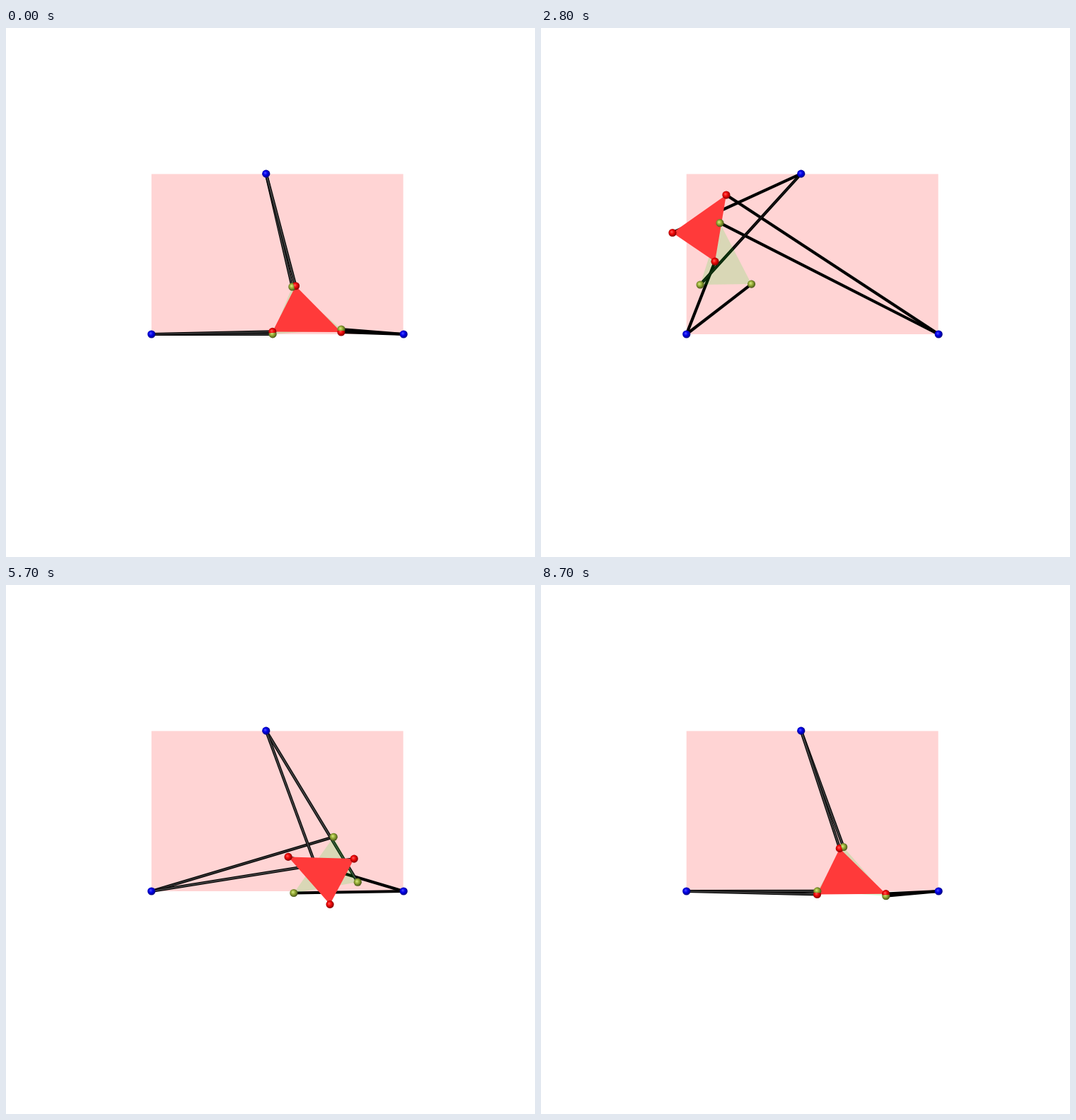
An HTML page with a canvas for the animation above (8800 ms loop, 748 by 748 pixels).

```html
<!DOCTYPE html>
<html lang="en">
<head>
<meta charset="utf-8">
<title>Planar platform and its closest singular pose</title>
<style>
  html, body { margin: 0; width: 100%; height: 100%; overflow: hidden; background: #fff; }
  canvas { display: block; }
</style>
</head>
<body>
<canvas id="stage" width="748" height="748"></canvas>
<script>
const ctx = document.getElementById('stage').getContext('2d');
const FRAMES = 88, FRAME_MS = 100, SCALE = 32.41;
const BASE = [[0, 0], [11, 0], [5, 7]];
const PLATFORM = [[0, 0], [3, 0], [1, 2]];
const PLATE_STIFFNESS = 2.2;
const TAU = 2 * Math.PI;

const BALLS = {
  blue: ['#5050ff', '#0000ea', '#000078'],
  red: ['#ff6060', '#f20808', '#7c0000'],
  green: ['#d8ec88', '#98ae38', '#425016']
};

// Given pose as a flat list x1, y1, x2, y2, x3, y3.
function givenPose(frame) {
  const phi = TAU * (frame + 1) / (FRAMES + 1), c = Math.cos(phi), s = Math.sin(phi);
  return PLATFORM.flatMap(([x, y]) =>
    [5.5 - 3 * s + c * x - s * y, 1.5 - 1.5 * c + s * x + c * y]);
}

const legLengths = pose => BASE.map(([x, y], i) => Math.hypot(pose[2 * i] - x, pose[2 * i + 1] - y));
const energy = list => list.reduce((sum, v) => sum + v * v, 0);
const distance = (p, q) => Math.sqrt(energy(p.map((v, i) => v - q[i])));

// Scaled strains of legs and plate; each is linear in the squared lengths.
function strains(r, lengths) {
  const out = BASE.map(([ax, ay], i) => {
    const dx = r[2 * i] - ax, dy = r[2 * i + 1] - ay, len = lengths[i];
    return ((dx * dx + dy * dy) / (len * len) - 1) / 2 * Math.sqrt(len);
  });
  const ux = r[2] - r[0], uy = r[3] - r[1], vx = r[4] - r[0], vy = r[5] - r[1];
  const e11 = (ux * ux + uy * uy - 9) / 18;
  const e12 = ((ux * vx + uy * vy - 3) / 6 - e11) / 2;
  const e22 = ((vx * vx + vy * vy - 5) / 2 - e11 - 4 * e12) / 4;
  const k = 2 * Math.sqrt(PLATE_STIFFNESS);
  out.push(k * (e11 + e22 / 2), k * Math.sqrt(0.75) * e22, k * e12);
  return out;
}

// Zero when the three leg lines meet in one point.
function concurrency(r, lengths) {
  const [a, b, c] = BASE.map(([ax, ay], i) => {
    const dx = r[2 * i] - ax, dy = r[2 * i + 1] - ay;
    return [dx, dy, ax * dy - ay * dx].map(v => v / lengths[i]);
  });
  return a[0] * (b[1] * c[2] - b[2] * c[1])
    - a[1] * (b[0] * c[2] - b[2] * c[0])
    + a[2] * (b[0] * c[1] - b[1] * c[0]);
}

function solve(m, b) {
  const n = b.length;
  for (let i = 0; i < n; i++) {
    for (let j = i + 1; j < n; j++) {
      const f = m[j][i] / m[i][i];
      for (let k = i; k < n; k++) m[j][k] -= f * m[i][k];
      b[j] -= f * b[i];
    }
  }
  for (let i = n - 1; i >= 0; i--) {
    for (let k = i + 1; k < n; k++) b[i] -= m[i][k] * b[k];
    b[i] /= m[i][i];
  }
  return b;
}

// Levenberg-Marquardt descent on a list of residuals.
function descend(residuals, r, steps, damping = 0.02) {
  let res = residuals(r), cost = energy(res);
  const dot = (p, q) => p.reduce((sum, v, i) => sum + v * q[i], 0);
  while (steps-- > 0) {
    const columns = r.map((v, i) => {
      const moved = r.slice();
      moved[i] += 1e-6;
      return residuals(moved).map((q, j) => (q - res[j]) / 1e-6);
    });
    const normal = columns.map((p, i) => columns.map((q, j) => dot(p, q) + (i === j ? damping : 0)));
    const step = solve(normal, columns.map(p => -dot(p, res)));
    const next = r.map((v, i) => v + step[i]);
    const nextRes = residuals(next), nextCost = energy(nextRes);
    if (nextCost < cost) {
      const gain = cost - nextCost;
      r = next; res = nextRes; cost = nextCost;
      damping = Math.max(damping * 0.25, 1e-9);
      if (gain < 1e-13) break;
    } else {
      damping *= 5;
      if (damping > 1e6) break;
    }
  }
  return { r, cost };
}

// Does the given pose arrive at the goal when all squared lengths change evenly?
function reaches(given, goal, lengths) {
  const target = strains(goal, lengths), steps = 40;
  let before = given, pose = given;
  for (let k = 1; k < steps; k++) {
    const t = 1 - (1 - k / steps) ** 2;
    const guess = pose.map((v, i) => 2 * v - before[i]);
    const found = descend(r => strains(r, lengths).map((v, i) => v - t * target[i]), guess, 25, 1e-5);
    if (found.cost > 1e-7) return false;
    before = pose;
    pose = found.r;
  }
  return distance(pose, goal) < 0.6;
}

// Singular poses of locally least deformation, sought from turned and shifted starts.
function singularPoses(given, lengths) {
  const cx = (given[0] + given[2] + given[4]) / 3, cy = (given[1] + given[3] + given[5]) / 3;
  const list = [];
  for (const [sx, sy] of [[0, 0], [1.2, -1.2], [-1.2, 1.2]]) {
    for (let turn = 0; turn < 12; turn++) {
      const c = Math.cos(turn * TAU / 12), s = Math.sin(turn * TAU / 12);
      let found = { r: [0, 2, 4].flatMap(i => {
        const x = given[i] - cx, y = given[i + 1] - cy;
        return [cx + sx + c * x - s * y, cy + sy + s * x + c * y];
      }) };
      for (const weight of [1, 6, 30]) {
        found = descend(r => [...strains(r, lengths), weight * concurrency(r, lengths)], found.r, 20);
      }
      const defect = (30 * concurrency(found.r, lengths)) ** 2;
      if (defect < 0.02 * found.cost && list.every(p => distance(p.r, found.r) > 0.02)) list.push(found);
    }
  }
  return list.sort((p, q) => p.cost - q.cost);
}

function closestSingularPose(given) {
  const lengths = legLengths(given), list = singularPoses(given, lengths);
  const best = list.find(p => reaches(given, p.r, lengths)) || list[0];
  return best ? best.r : given;
}

const toScreen = (x, y) => [205.7 + SCALE * x, 433 - SCALE * y];
const screenPoints = pose => [0, 2, 4].map(i => toScreen(pose[i], pose[i + 1]));
const anchors = BASE.map(([x, y]) => toScreen(x, y));

const cache = [];
function poses(frame) {
  if (!cache[frame]) {
    const given = givenPose(frame);
    cache[frame] = { green: screenPoints(given), red: screenPoints(closestSingularPose(given)) };
  }
  return cache[frame];
}

function line(a, b, width, color) {
  ctx.beginPath();
  ctx.moveTo(...a);
  ctx.lineTo(...b);
  ctx.lineWidth = width;
  ctx.strokeStyle = color;
  ctx.stroke();
}

function leg(a, b) {
  const light = (b[0] - a[0]) + 1.3 * (b[1] - a[1]);
  const gray = Math.max(0, Math.min(62, light * 0.3));
  line(a, b, 4.2, '#000');
  line(a, b, 2.2, `rgb(${gray},${gray},${gray})`);
}

function triangle(points, color) {
  ctx.beginPath();
  points.forEach(p => ctx.lineTo(...p));
  ctx.closePath();
  ctx.fillStyle = color;
  ctx.fill();
}

function ball([x, y], [light, body, edge]) {
  const shade = ctx.createRadialGradient(x - 1.3, y - 1.3, 0, x - 0.5, y - 0.5, 6.3);
  shade.addColorStop(0, light);
  shade.addColorStop(0.45, body);
  shade.addColorStop(1, edge);
  ctx.beginPath();
  ctx.arc(x, y, 5.6, 0, TAU);
  ctx.fillStyle = shade;
  ctx.fill();
}

// Two equal spheres at one depth meet in the plane halfway between them.
function ballPair(green, red) {
  const mx = (green[0] + red[0]) / 2, my = (green[1] + red[1]) / 2;
  const angle = Math.atan2(red[1] - green[1], red[0] - green[0]);
  ball(green, BALLS.green);
  ctx.save();
  ctx.translate(mx, my);
  ctx.rotate(angle);
  ctx.beginPath();
  ctx.rect(0, -900, 900, 1800);
  ctx.clip();
  ctx.rotate(-angle);
  ctx.translate(-mx, -my);
  ball(red, BALLS.red);
  ctx.restore();
}

function draw(now) {
  const { green, red } = poses(Math.floor(now / FRAME_MS) % FRAMES);
  ctx.fillStyle = '#fff';
  ctx.fillRect(0, 0, 748, 748);
  ctx.fillStyle = '#ffd4d4';
  ctx.fillRect(205.7, 206.5, 356, 226.5);
  anchors.forEach((a, i) => { leg(a, green[i]); leg(a, red[i]); });
  triangle(green, 'rgba(0,225,10,0.15)');
  triangle(red, '#ff3a3a');
  anchors.forEach(a => ball(a, BALLS.blue));
  green.forEach((g, i) => ballPair(g, red[i]));
  requestAnimationFrame(draw);
}
requestAnimationFrame(draw);
</script>
</body>
</html>
```
